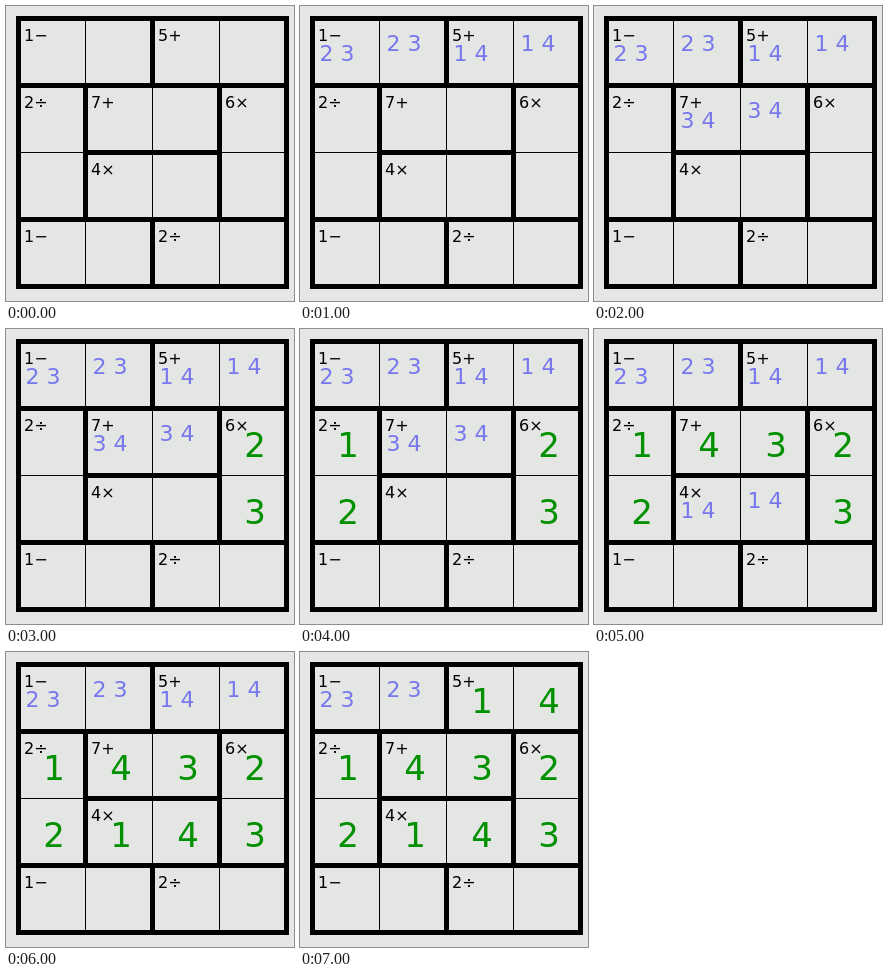
Animation of 288x295 px, one loop 8 s. Source, as an HTML page with a canvas:

```html
<!DOCTYPE html>
<html lang="en">
<head>
<meta charset="utf-8">
<title>Arithmetic cage puzzle</title>
<style>
  html, body { margin: 0; overflow: hidden; background: #e6e6e6; }
  canvas { display: block; }
</style>
</head>
<body>
<canvas id="board" width="288" height="295"></canvas>
<script>
const ctx = document.getElementById('board').getContext('2d');
const CELL = 67, EDGE = 12.5, STEP = 1000, STEPS = 8;

// [column, row, text]
const clues = [
  [0, 0, '1−'], [2, 0, '5+'], [0, 1, '2÷'], [1, 1, '7+'],
  [3, 1, '6×'], [1, 2, '4×'], [0, 3, '1−'], [2, 3, '2÷'],
];

// Walls between cages, in cell units: [x1, y1, x2, y2]
const walls = [
  [0, 1, 4, 1], [0, 3, 4, 3], [1, 2, 3, 2],
  [2, 0, 2, 1], [2, 3, 2, 4], [1, 1, 1, 3], [3, 1, 3, 3],
];

// [column, row, text, baseline, first step, end step]
const LOW = 55, HIGH = 45;
const notes = [
  [0, 0, '2 3', LOW, 1, 8], [1, 0, '2 3', HIGH, 1, 8],
  [2, 0, '1 4', LOW, 1, 7], [3, 0, '1 4', HIGH, 1, 7],
  [1, 1, '3 4', LOW, 2, 5], [2, 1, '3 4', HIGH, 2, 5],
  [1, 2, '1 4', LOW, 5, 6], [2, 2, '1 4', HIGH, 5, 6],
];

// [column, row, digit, first step]
const answers = [
  [3, 1, '2', 3], [3, 2, '3', 3], [0, 1, '1', 4], [0, 2, '2', 4],
  [1, 1, '4', 5], [2, 1, '3', 5], [1, 2, '1', 6], [2, 2, '4', 6],
  [2, 0, '1', 7], [3, 0, '4', 7],
];

function line(x1, y1, x2, y2, width) {
  ctx.lineWidth = width;
  ctx.beginPath();
  ctx.moveTo(EDGE + x1 * CELL, EDGE + y1 * CELL);
  ctx.lineTo(EDGE + x2 * CELL, EDGE + y2 * CELL);
  ctx.stroke();
}

function textStyle(size, color, align) {
  ctx.font = `${size}px "DejaVu Sans", sans-serif`;
  ctx.fillStyle = color;
  ctx.textAlign = align;
}

function write(col, row, text, x, y) {
  ctx.fillText(text, col * CELL + x, row * CELL + y);
}

function drawGrid() {
  ctx.fillStyle = '#e6e6e6';
  ctx.fillRect(0, 0, 288, 295);
  ctx.fillStyle = '#e4e6e3';
  ctx.fillRect(EDGE, EDGE, 4 * CELL, 4 * CELL);
  ctx.strokeStyle = '#000';
  for (let i = 1; i < 4; i++) {
    line(i, 0, i, 4, 1);
    line(0, i, 4, i, 1);
  }
  for (const wall of walls) line(...wall, 5);
  ctx.strokeRect(EDGE, EDGE, 4 * CELL, 4 * CELL);
}

function draw(step) {
  drawGrid();
  textStyle(16, '#000', 'left');
  for (const [col, row, text] of clues) write(col, row, text, 18, 35);
  textStyle(22, '#7777ee', 'center');
  for (const [col, row, text, y, from, to] of notes)
    if (step >= from && step < to) write(col, row, text, 37, y);
  textStyle(34, '#009000', 'center');
  for (const [col, row, digit, from] of answers)
    if (step >= from) write(col, row, digit, 48, 61);
}

const start = performance.now();
function tick() {
  draw(Math.floor((performance.now() - start) / STEP) % STEPS);
  requestAnimationFrame(tick);
}
tick();
</script>
</body>
</html>
```
